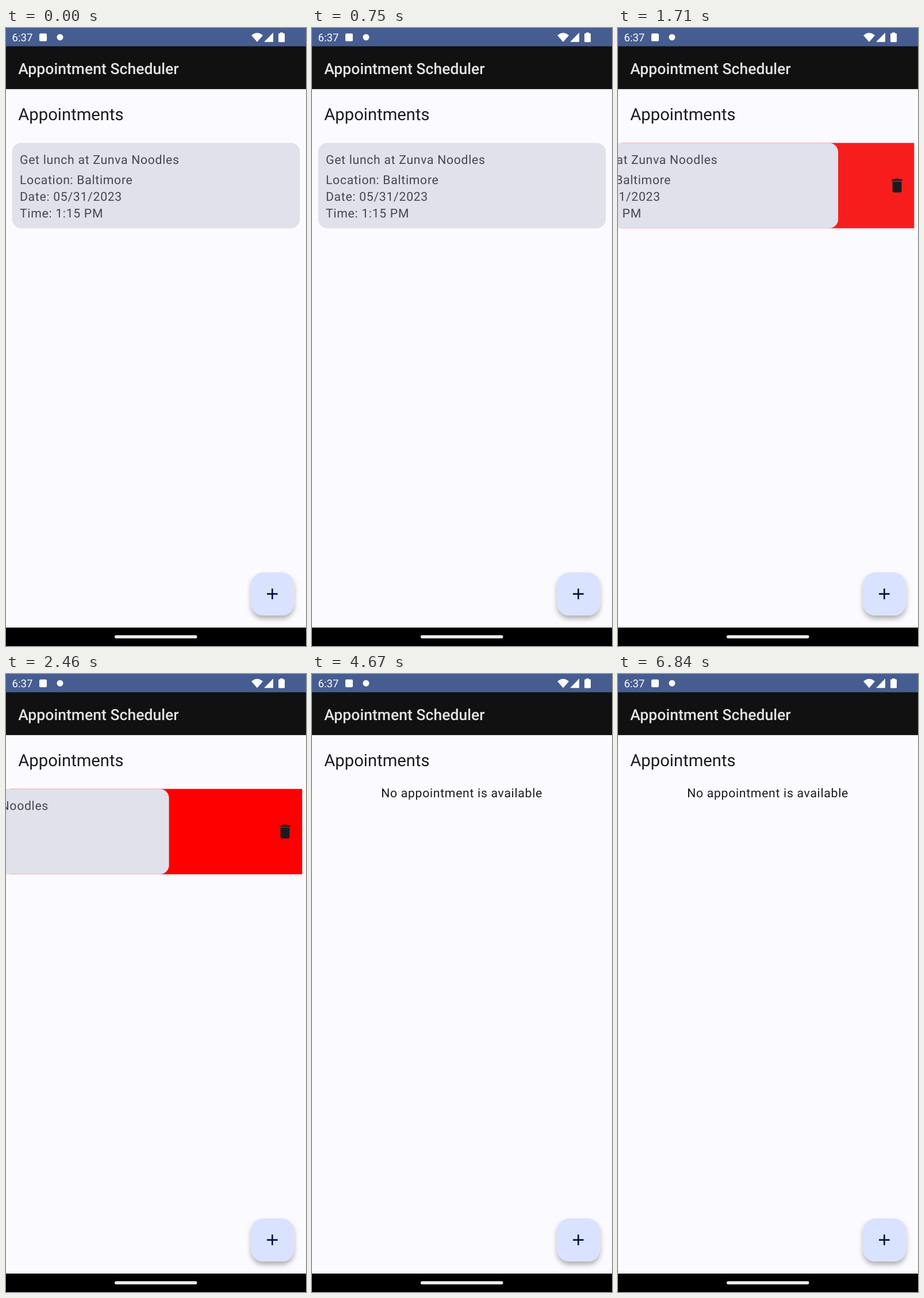
Animation, 522 px wide and 1073 px high, one loop 6890 ms. Source, as an HTML page:

```html
<!DOCTYPE html>
<html lang="en">
<head>
<meta charset="utf-8">
<title>Appointment Scheduler</title>
<style>
  html, body { margin: 0; width: 100%; height: 100%; overflow: hidden; background: #fbfafe; }
  svg { display: block; }
  text { font-family: Roboto, "Noto Sans", sans-serif; white-space: pre; text-rendering: geometricPrecision; }
  .body { font-size: 21.27px; letter-spacing: .665px; }
</style>
</head>
<body>
<svg width="522" height="1073" viewBox="0 0 522 1073">
  <defs>
    <filter id="shadow" x="-30%" y="-30%" width="160%" height="170%">
      <feDropShadow dx="0" dy="5.5" stdDeviation="4" flood-color="#000" flood-opacity=".3"/>
    </filter>
  </defs>
  <rect width="522" height="1073" fill="#fbfafe"/>

  <!-- status bar -->
  <rect width="522" height="32" fill="#465d92"/>
  <g fill="#fff">
    <text x="10.5" y="23" font-size="18.6">6:37</text>
    <rect x="58" y="9.5" width="13" height="13.5" rx="2"/>
    <circle cx="94" cy="16" r="5.5"/>
    <path d="M427 12.8Q437 4 447 12.8L437 24.3Z"/>
    <path d="M449 24.3L465 8V24.3Z"/>
    <path d="M477 9.3V7.7H482V9.3H483.7Q485 9.3 485 10.6V23.2Q485 24.5 483.7 24.5H475.3Q474 24.5 474 23.2V10.6Q474 9.3 475.3 9.3Z"/>
  </g>

  <!-- app bar -->
  <rect y="31.7" width="522" height="74.4" fill="#111"/>
  <text x="21.3" y="79.5" font-size="26.58" font-weight="500" fill="#e3e2e6">Appointment Scheduler</text>
  <text x="21.3" y="160" font-size="29.24" fill="#1b1b1f">Appointments</text>

  <!-- swipeable row -->
  <g id="row">
    <g id="back">
      <rect id="fill" x="6.65" y="199.5" width="508.7" height="148.2"/>
      <path transform="translate(469.55 257.5) scale(1.329)" fill="#1b1b1f"
        d="M6 19c0 1.1.9 2 2 2h8c1.1 0 2-.9 2-2V7H6v12zM19 4h-3.5l-1-1h-5l-1 1H5v2h14V4z"/>
    </g>
    <g id="card" class="body" fill="#45464f">
      <rect x="10.7" y="199.5" width="500.6" height="148.2" rx="16" fill="#e0e1eb"/>
      <text x="24" y="236">Get lunch at Zunva Noodles</text>
      <text x="24" y="271.3">Location: Baltimore</text>
      <text x="24" y="300">Date: 05/31/2023</text>
      <text x="24" y="328.5">Time: 1:15 PM</text>
    </g>
  </g>
  <text id="empty" class="body" x="120.2" y="214.3" fill="#1b1b1f">No appointment is available</text>

  <!-- add button -->
  <rect x="426.4" y="945.3" width="74.7" height="74.7" rx="21.3" fill="#d9e2ff" filter="url(#shadow)"/>
  <path transform="translate(447.4 966.6) scale(1.329)" fill="#050f44" d="M19 13h-6v6h-2v-6H5v-2h6V5h2v6h6v2z"/>

  <!-- navigation bar -->
  <rect y="1041" width="522" height="32" fill="#000"/>
  <rect x="189" y="1054.3" width="143.5" height="5.4" rx="2.7" fill="#ededed"/>
</svg>
<script>
  const LOOP = 6890, DRAG = 1460, ARMED = 1622, RELEASE = 2540, REMOVED = 2920;
  const HELD = 228, WIDTH = 508.7;
  const el = id => document.getElementById(id);
  const [row, back, fill, card, empty] = ['row', 'back', 'fill', 'card', 'empty'].map(el);

  // Distance left to travel, 1 to 0, on a critically damped spring.
  const spring = ms => {
    const x = Math.max(0, ms) * 0.0387;
    return (1 + x) * Math.exp(-x);
  };

  function offset(t) {
    if (t <= DRAG) return 0;
    if (t < RELEASE) return HELD * (1 - Math.exp(-(((t - DRAG) / 285) ** 1.5)));
    return WIDTH - (WIDTH - HELD) * spring(t - RELEASE);
  }

  const show = (node, on) => node.setAttribute('visibility', on ? 'inherit' : 'hidden');

  function draw(t) {
    const gone = t >= REMOVED, x = offset(t), grey = spring(t - ARMED);
    show(row, !gone);
    show(empty, gone);
    show(back, x > 0);
    card.setAttribute('transform', `translate(${-x} 0)`);
    fill.setAttribute('fill', `rgb(${255 - 51 * grey},${204 * grey},${204 * grey})`);
  }

  const start = performance.now();
  function tick() {
    draw((performance.now() - start) % LOOP);
    requestAnimationFrame(tick);
  }
  draw(0);
  requestAnimationFrame(tick);
</script>
</body>
</html>
```
